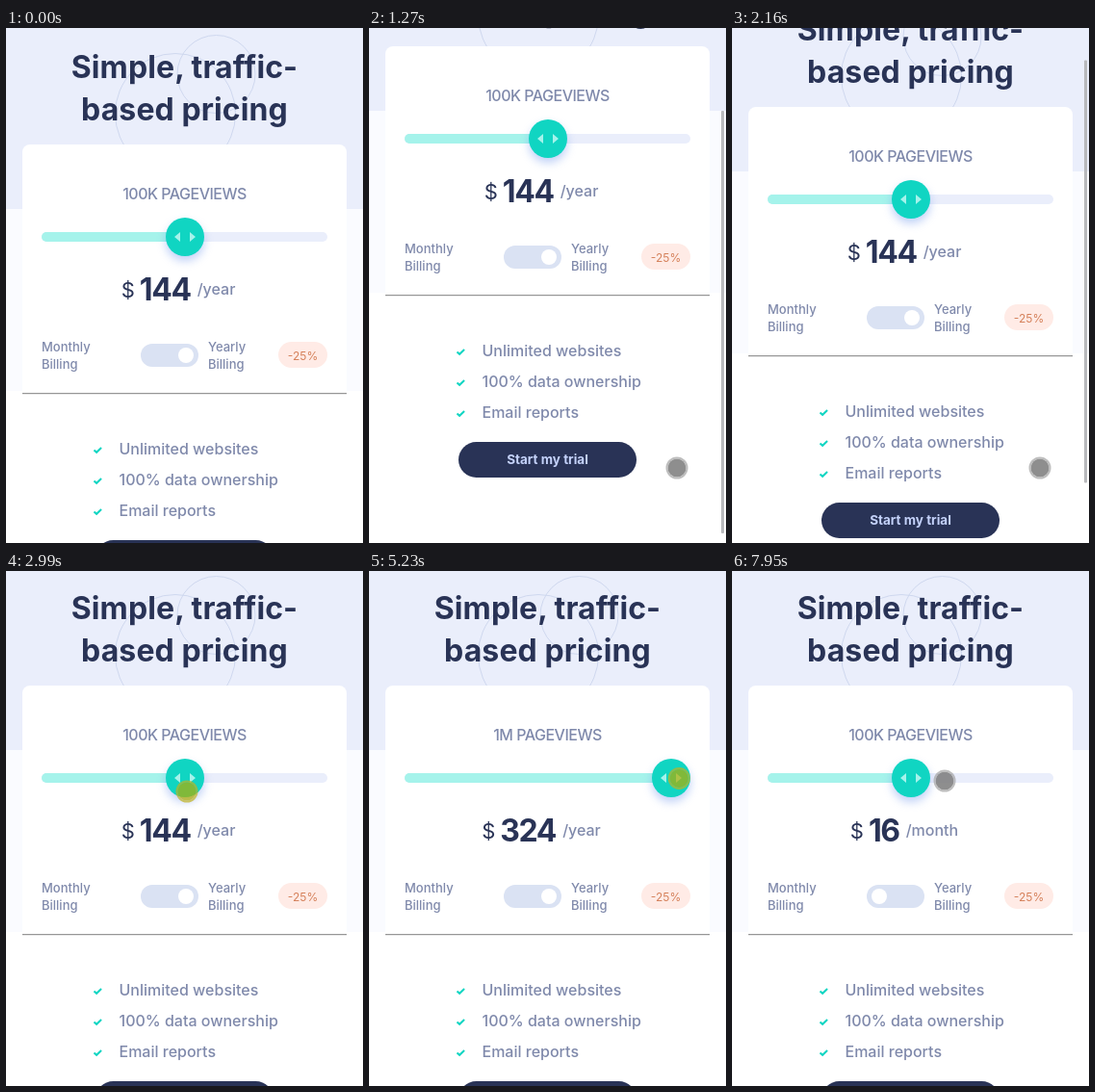
Animation of 371x535 px, one loop 8000 ms. Source, as an HTML page:

```html
<!DOCTYPE html>
<html lang="en">
<head>
<meta charset="utf-8">
<title>Traffic-based pricing</title>
<style>
  html, body { margin: 0; width: 100%; height: 100%; overflow: hidden; background: #fff; }
  svg { display: block; width: 371px; height: 535px; }
  text { font-family: Inter, "Open Sans", sans-serif; font-weight: 500; font-size: 16px; fill: #7f89ab; }
  .title { font-size: 32px; font-weight: 700; fill: #293356; letter-spacing: .1px; }
  .views { letter-spacing: -.5px; }
  .dollar { font-size: 22px; font-weight: 400; fill: #293356; }
  .amount { font-size: 32px; font-weight: 700; fill: #293356; letter-spacing: -1.4px; }
  .small { font-size: 13px; }
  .discount { font-size: 12px; font-weight: 400; fill: #d5805a; }
  .cta { font-size: 13.5px; font-weight: 700; fill: #c4d2fa; }
  .mid { text-anchor: middle; }
  .rings { fill: none; stroke: #cfd8ef; }
  .check { fill: none; stroke: #10d5c2; stroke-width: 2; }
  .knob { fill: #10d5c2; filter: drop-shadow(0 5px 5px rgba(105, 145, 235, .42)); }
  #dot { fill: rgba(125, 125, 125, .87); }
  #rim { fill: none; stroke: rgba(165, 165, 165, .72); stroke-width: 2; }
  .pressed #dot { fill: rgba(176, 172, 0, .7); }
  .pressed #rim { stroke: rgba(192, 178, 30, .7); }
</style>
</head>
<body>
<svg viewBox="0 0 371 535">
  <g id="page">
    <rect width="371" height="188" fill="#eaeefb"/>
    <rect y="188" width="371" height="189" fill="#fafbff"/>
    <g class="rings">
      <circle cx="176" cy="89" r="62.5"/>
      <circle cx="218.5" cy="48" r="40.5"/>
    </g>
    <text class="title mid" x="185.5" y="52">Simple, traffic-</text>
    <text class="title mid" x="185.5" y="96">based pricing</text>

    <rect x="17" y="121" width="337" height="560" rx="8" fill="#fff"/>
    <text class="views mid" id="views" x="185.5" y="178"></text>

    <rect x="37" y="212" width="297" height="10" rx="5" fill="#eaeefb"/>
    <rect id="filled" x="37" y="212" height="10" rx="5" fill="#a5f3eb"/>
    <g id="handle">
      <circle class="knob" r="20"/>
      <path d="M-5-5V5L-11 0ZM5-5V5L11 0Z" fill="#a5f3eb"/>
    </g>

    <text class="mid" x="179" y="280"><tspan class="dollar">$</tspan><tspan class="amount" id="amount" dx="5" dy="3"></tspan><tspan id="period" dx="7" dy="-6"></tspan></text>

    <text class="small" x="37" y="336">Monthly</text>
    <text class="small" x="37" y="354">Billing</text>
    <rect x="140" y="328" width="60" height="24" rx="12" fill="#dae2f3"/>
    <circle id="toggle" cy="340" r="8" fill="#fff"/>
    <text class="small" x="210" y="336">Yearly</text>
    <text class="small" x="210" y="354">Billing</text>
    <rect x="283" y="326" width="51" height="27" rx="13.5" fill="#ffebe6"/>
    <text class="discount mid" x="308.5" y="344.5">-25%</text>

    <rect x="17" y="379" width="337" height="1" fill="#969696"/>
    <rect x="17" y="380" width="337" height="1" fill="#e6e6e6"/>

    <path id="check" class="check" d="M91.5 438.5l2.6 2.3 5-4.8"/>
    <use href="#check" y="32"/>
    <use href="#check" y="64"/>
    <text x="117.5" y="443">Unlimited websites</text>
    <text x="117.5" y="475">100% data ownership</text>
    <text x="117.5" y="507">Email reports</text>
    <rect x="93" y="532" width="185" height="37" rx="18.5" fill="#293356"/>
    <text class="cta mid" x="185.5" y="555">Start my trial</text>
  </g>

  <rect id="bar" x="366" width="3" height="439" rx="1" fill="#b8b9bc"/>
  <g id="cursor">
    <circle id="dot" r="9.5"/>
    <circle id="rim" r="10.5"/>
  </g>
</svg>
<script>
const $ = id => document.getElementById(id);
const LOOP = 8000, START = 730, TOGGLED = 7330;
const FIRST_STOP = 57, STOP_GAP = 64.3;

const views = ["10K", "50K", "100K", "500K", "1M"];
const monthlyPrice = [8, 12, 16, 24, 36];

// Cursor moves: start, end, and where each one ends
const moves = [
  [2300, 2650, 188, 229],
  [2990, 3810, 56, 219],
  [4070, 4620, 182, 217],
  [4890, 5370, 358, 215],
  [5900, 6310, 238, 214],
  [6500, 6600, 185, 214],
  [6850, 7120, 158, 348],
  [7450, 7950, 221, 218]
];

const ramp = (t, from, to) => Math.min(1, Math.max(0, (t - from) / (to - from)));
const smooth = k => k * k * (3 - 2 * k);
const within = (t, from, to) => t >= from && t < to;

function set(id, attrs) {
  for (const name in attrs) $(id).setAttribute(name, attrs[name]);
}

function cursorAt(t) {
  let x = 320, y = 457;
  for (const [from, to, endX, endY] of moves) {
    const k = smooth(ramp(t, from, to));
    x += (endX - x) * k;
    y += (endY - y) * k;
  }
  return [x, y];
}

function draw(t) {
  const down = ramp(t, START, 1270) ** 3;
  const up = smooth(ramp(t, 1880, 2356));
  const scroll = Math.round(102 * down - 100 * up);
  const barFade = t < 1880 ? ramp(t, 1740, 1530) : ramp(t, 2640, 2440);
  set("page", { transform: `translate(0 ${-scroll})` });
  set("bar", { y: 1 + scroll * 5 / 6, opacity: t < START ? 0 : barFade });

  const [x, y] = cursorAt(t);
  const dragging = within(t, 2720, 6800);
  const clicking = within(t, TOGGLED - 20, TOGGLED + 110);
  set("cursor", {
    transform: `translate(${x} ${y})`,
    opacity: t < START ? 0 : 1,
    class: dragging || clicking ? "pressed" : ""
  });

  // While dragged, the handle snaps to the stop nearest the cursor
  const nearest = Math.round((x - FIRST_STOP) / STOP_GAP);
  const stop = dragging ? Math.min(4, Math.max(0, nearest)) : 2;
  const handleX = Math.round(FIRST_STOP + stop * STOP_GAP);
  set("handle", { transform: `translate(${handleX} 217)` });
  set("filled", { width: handleX - 37 });

  const monthly = t >= TOGGLED;
  $("views").textContent = views[stop] + " PAGEVIEWS";
  $("amount").textContent = monthlyPrice[stop] * (monthly ? 1 : 9);
  $("period").textContent = monthly ? "/month" : "/year";
  set("toggle", { cx: 187 - 34 * ramp(t, TOGGLED, TOGGLED + 200) });
}

function frame(now) {
  draw(now % LOOP);
  requestAnimationFrame(frame);
}
draw(0);
requestAnimationFrame(frame);
</script>
</body>
</html>
```
